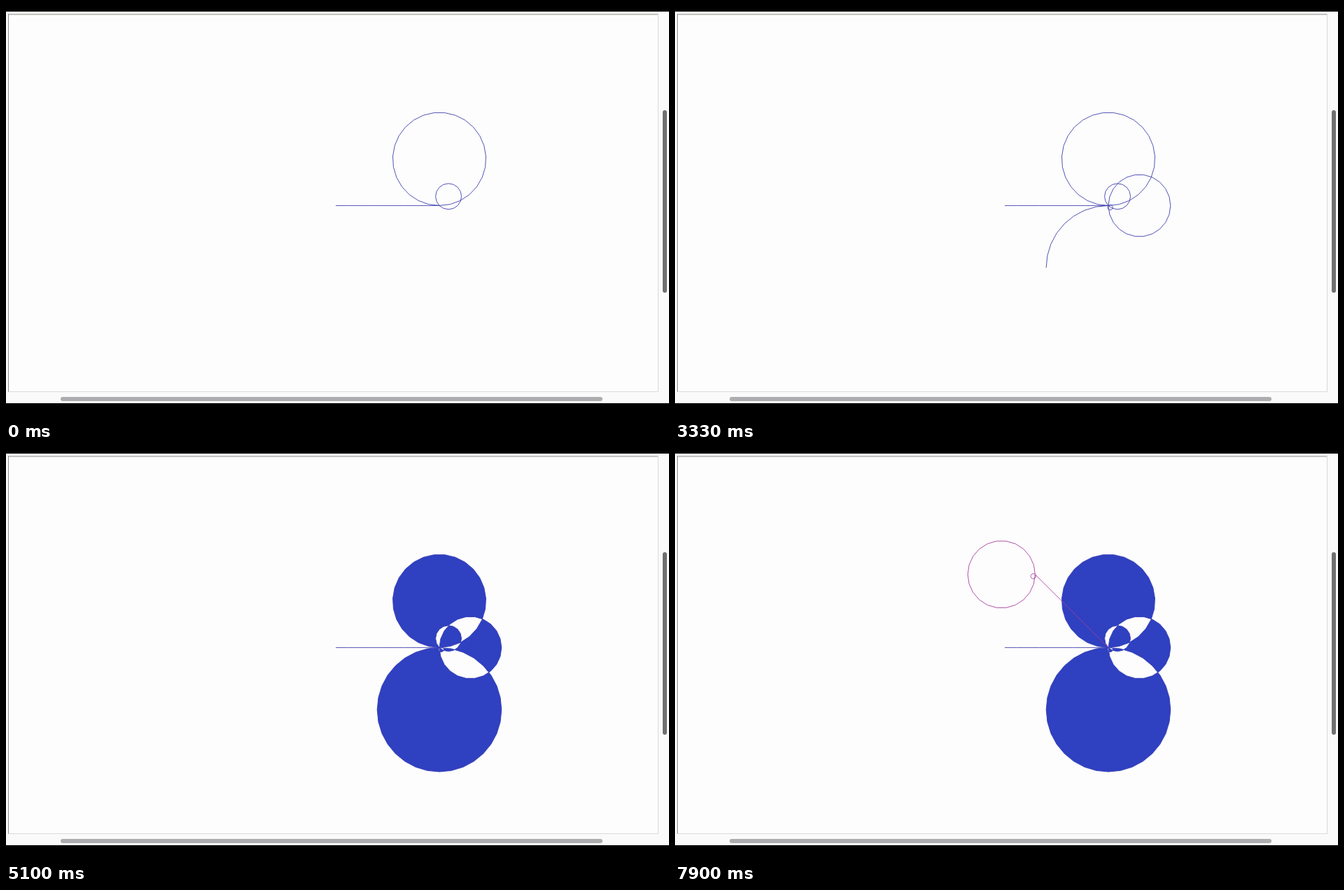
An HTML page with a canvas that plays this animation: 947 by 592 pixels, repeating every 8000 ms.

```html
<!DOCTYPE html>
<html lang="en">
<head>
<meta charset="utf-8">
<title>Turtle circles</title>
<style>
  html, body { margin: 0; width: 100%; height: 100%; overflow: hidden; background: #000; }
  canvas { display: block; }
</style>
</head>
<body>
<canvas id="stage" width="947" height="592"></canvas>
<script>
const ctx = document.getElementById('stage').getContext('2d');
const LOOP = 8000;
const SCALE = 0.74;     // pixels per turtle unit
const EDGE_MS = 69.33;  // time per circle edge
const HOP_MS = 17.3;    // time per hop on a straight line
const FILL_AT = 5080;
const BLUE = '#3f40ae', FILL = '#2f40c0', PURPLE = '#a83f9c';

const move = ([x, y], heading, length) => {
  const a = heading * Math.PI / 180;
  return [x + length * SCALE * Math.cos(a), y - length * SCALE * Math.sin(a)];
};

// A full left-hand circle is a polygon whose edge count grows with its radius.
function circle(start, heading, radius, at, color) {
  const edges = 1 + Math.floor(11 + radius / 6);
  const turn = 360 / edges;
  const length = 2 * radius * Math.sin(Math.PI / edges);
  const points = [start];
  for (let i = 0; i < edges; i++) {
    points.push(move(points[i], heading + turn * (i + 0.5), length));
  }
  return { points, at, step: EDGE_MS, color };
}

function line(start, heading, length, hops, at, color) {
  const points = [];
  for (let i = 0; i <= hops; i++) points.push(move(start, heading, length * i / hops));
  return { points, at, step: HOP_MS, color };
}

const home = [471, 285.4];
const hub = move(home, 0, 200);
const tip = move(hub, 135, 200);
const DONE = -LOOP;

const blueCircles = [
  circle(hub, 0, 90, DONE, BLUE),
  circle(hub, -45, 25, DONE, BLUE),
  circle(hub, -90, 60, 110, BLUE),
  circle(hub, -135, 5, 1792, BLUE),
  circle(hub, -180, 120, 2785, BLUE)
];
const blueStrokes = [line(home, 0, 200, 9, DONE, BLUE), ...blueCircles];
const purpleStrokes = [
  line(hub, 135, 200, 9, 5148, PURPLE),
  circle(tip, 135, 5, 5356, PURPLE),
  circle(tip, 90, 65, 6343, PURPLE)
];

function trace(points) {
  points.forEach(([x, y], i) => i ? ctx.lineTo(x, y) : ctx.moveTo(x, y));
}

function drawStroke({ points, at, step, color }, t) {
  if (t < at) return;
  ctx.beginPath();
  trace(points.slice(0, Math.floor((t - at) / step) + 2));
  ctx.strokeStyle = color;
  ctx.lineWidth = 0.9;
  ctx.stroke();
}

function rect(color, x, y, w, h) {
  ctx.fillStyle = color;
  ctx.fillRect(x, y, w, h);
}

function thumb(color, x, y, w, h) {
  ctx.beginPath();
  ctx.roundRect(x, y, w, h, 3);
  ctx.fillStyle = color;
  ctx.fill();
}

function drawWindow() {
  rect('#000', 0, 0, 947, 592);
  rect('#fafafa', 0, 8, 947, 560);
  rect('#fdfdfd', 3, 11, 929, 541);
  rect('#d9dad9', 3, 551, 929, 1);
  rect('#d9dad9', 931, 11, 1, 541);
  rect('#8b8c86', 3, 11.5, 928, 1);
  rect('#8b8c86', 3, 11.5, 1, 540);
  thumb('#707070', 938, 149, 6, 261);
  thumb('#adadaf', 78, 559, 774, 6);
}

function draw(t) {
  drawWindow();
  blueStrokes.forEach(s => drawStroke(s, t));
  if (t >= FILL_AT) {
    ctx.beginPath();
    blueCircles.forEach(c => trace(c.points));
    ctx.fillStyle = FILL;
    ctx.fill('evenodd');
  }
  purpleStrokes.forEach(s => drawStroke(s, t));
}

const begin = performance.now();
function frame() {
  draw((performance.now() - begin) % LOOP);
  requestAnimationFrame(frame);
}
frame();
</script>
</body>
</html>
```
